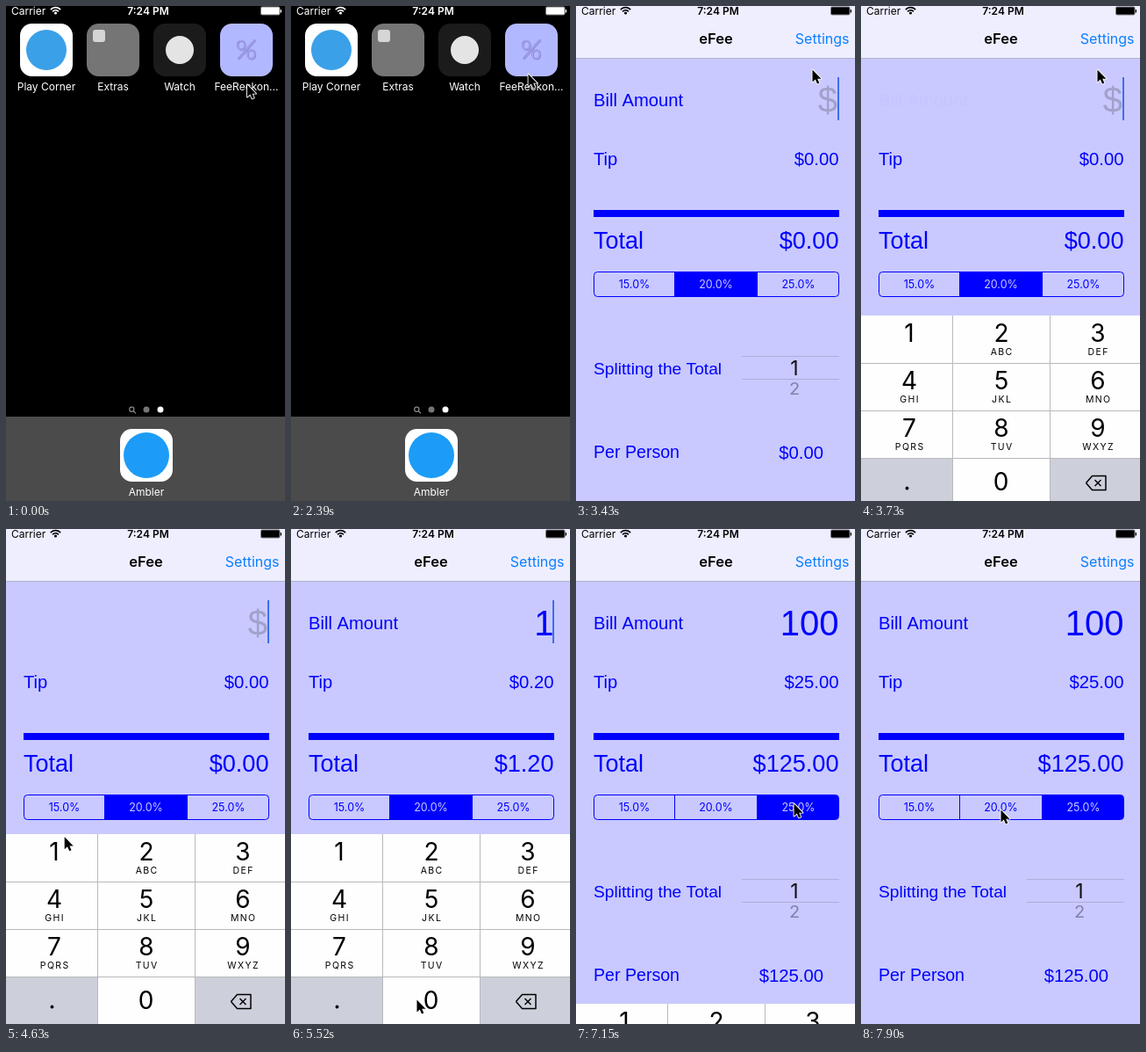
These frames come from a looping animation (318 px wide and 563 px high, 8000 ms). An HTML page with a canvas:

```html
<!DOCTYPE html>
<html lang="en">
<head>
<meta charset="utf-8">
<title>Tip calculator demo</title>
<style>
  html, body { margin: 0; width: 100%; height: 100%; overflow: hidden; background: #000; }
  canvas { display: block; width: 318px; height: 563px; }
</style>
</head>
<body>
<canvas id="stage"></canvas>
<script>
const W = 318, H = 563, LOOP = 8000, STEP = 149.2;
const UI = 'Inter, sans-serif', HELV = '"Liberation Sans", Arial, sans-serif';
const BLUE = '#00f', LAVENDER = '#c9c9ff', SPLASH = '#b0aeff', KEY_GREY = '#cdd0da';
const KEYBOARD_H = 216, KEYBOARD_TOP = H - KEYBOARD_H;

const canvas = document.getElementById('stage');
const ctx = canvas.getContext('2d');
const dpr = window.devicePixelRatio || 1;
canvas.width = W * dpr;
canvas.height = H * dpr;

// Pointer tip: [tick, x, y]
const POINTER = [
  [0, 274.5, 89], [1, 270, 80], [3, 270, 80], [4, 270, 82], [5, 270, 82], [6, 270, 83],
  [15, 270, 83], [16, 270, 77], [17, 269, 72], [26, 269, 72], [32, 50, 372], [34, 50, 372],
  [37, 143, 535], [42, 143, 535], [43, 158, 449], [45, 248, 312], [48, 248, 312], [53, 159, 319]
];

const clamp = v => Math.max(0, Math.min(1, v));

function scoped(draw, alpha = 1) {
  ctx.save();
  ctx.globalAlpha *= alpha;
  draw();
  ctx.restore();
}

function text(str, x, y, size, color, { font = UI, align = 'left', weight = 400, spacing = 0 } = {}) {
  ctx.font = `${weight} ${size}px ${font}`;
  ctx.textAlign = align;
  ctx.letterSpacing = spacing + 'px';
  ctx.fillStyle = color;
  ctx.fillText(str, x, y);
}

function rect(x, y, w, h, color) {
  ctx.fillStyle = color;
  ctx.fillRect(x, y, w, h);
}

function roundRect(x, y, w, h, r, color) {
  ctx.beginPath();
  ctx.roundRect(x, y, w, h, r);
  ctx.fillStyle = color;
  ctx.fill();
}

function disc(x, y, r, color) {
  ctx.beginPath();
  ctx.arc(x, y, r, 0, 7);
  ctx.fillStyle = color;
  ctx.fill();
}

function line(points, color, width = 1) {
  ctx.beginPath();
  points.forEach(([x, y]) => ctx.lineTo(x, y));
  ctx.strokeStyle = color;
  ctx.lineWidth = width;
  ctx.stroke();
}

function statusBar(color) {
  text('Carrier', 6, 10, 12, color);
  ctx.strokeStyle = color;
  ctx.lineWidth = 1.7;
  for (const r of [4.6, 7.8]) {
    ctx.beginPath();
    ctx.arc(56.5, 9.5, r, -Math.PI * 0.76, -Math.PI * 0.24);
    ctx.stroke();
  }
  disc(56.5, 8, 1.6, color);
  text('7:24 PM', 162, 10, 12, color, { align: 'center', weight: 600 });
  scoped(() => roundRect(290, 0.5, 22.5, 10, 2, color), 0.5);
  roundRect(291, 1.5, 20.5, 8, 1, color);
  roundRect(312.7, 4, 1.3, 3.5, 0.6, color);
}

// Embossed: a soft shadow, a dark rim and a light face.
function percentSign(x, y, scale) {
  scoped(() => {
    ctx.translate(x, y);
    ctx.scale(scale, scale);
    const shape = new Path2D();
    shape.ellipse(-17, -16, 12, 14, 0, 0, 7);
    shape.moveTo(27.5, 14);
    shape.ellipse(15.5, 14, 12, 14, 0, 0, 7);
    shape.moveTo(-27, 29);
    shape.lineTo(28, -33);
    for (const [shift, width, color] of [[2, 5, '#8886cc'], [0, 5, '#7f7dcb'], [0.5, 3.6, '#aaa8f8']]) {
      scoped(() => {
        ctx.translate(shift, shift);
        ctx.strokeStyle = color;
        ctx.lineWidth = width;
        ctx.stroke(shape);
      });
    }
  });
}

function appIcon(x, y, color, label) {
  roundRect(x, y, 60, 60, 13.5, color);
  text(label, x + 30, y + 76, 12, '#fff', { align: 'center' });
}

function home(pressed) {
  appIcon(16, 20, '#fff', 'Play Corner');
  disc(46, 50, 23, '#3aa0e8');
  appIcon(92, 20, '#757575', 'Extras');
  roundRect(99, 27, 14, 14, 3, '#d5d5d5');
  appIcon(168, 20, '#1b1b1b', 'Watch');
  disc(198, 50, 16, '#e4e4e4');
  appIcon(244, 20, '#b2b8ff', 'FeeReckon...');
  percentSign(274, 50, 0.35);
  if (pressed) roundRect(244, 20, 60, 60, 13.5, 'rgba(0,0,0,.45)');

  ctx.beginPath();
  ctx.arc(143.3, 458.7, 2.6, 0, 7);
  ctx.strokeStyle = '#8a8a8a';
  ctx.lineWidth = 1.2;
  ctx.stroke();
  line([[145.3, 460.7], [148, 463.4]], '#8a8a8a', 1.3);
  disc(160, 459, 3.5, '#757575');
  disc(176, 459, 3.5, '#fff');

  rect(0, 467, W, 96, '#4b4b4b');
  appIcon(130, 481, '#fff', 'Ambler');
  disc(160, 511, 26, '#1c9cf6');
}

// The launch window grows out of its icon and carries the home screen with it.
function launch(p, pressed) {
  const x = 244 * (1 - p), y = 20 * (1 - p) ** 2;
  const w = 60 + 258 * p ** 0.95, h = 60 + 503 * p ** 1.335;
  scoped(() => {
    const zoom = w / 60;
    ctx.translate(x, y);
    ctx.scale(zoom, zoom);
    ctx.translate(-244, -20);
    home(pressed);
  }, 1 - p);
  scoped(() => statusBar('#fff'), 1 - p);
  if (!p) return;
  scoped(() => {
    rect(x, y, w, h, SPLASH);
    percentSign(x + w / 2, y + h / 2 - 1, 1.21 * w / W);
    ctx.translate(x, y + (p < 1 ? 2.7 : 0));
    ctx.scale(w / W, w / W);
    statusBar('#000');
  }, clamp(p * 1.5));
}

function keyboard(offset, pressedKey) {
  const letters = ['', 'ABC', 'DEF', 'GHI', 'JKL', 'MNO', 'PQRS', 'TUV', 'WXYZ'];
  const edges = [0, 104.5, 215.5, W], centers = [55, 160, 270];
  scoped(() => {
    ctx.translate(0, KEYBOARD_TOP + offset);
    rect(0, 0, W, KEYBOARD_H, '#fefefe');
    const fillKey = (col, row) =>
      rect(edges[col], row * 54, edges[col + 1] - edges[col], 54, KEY_GREY);
    fillKey(0, 3);
    fillKey(2, 3);
    if (pressedKey === '1') fillKey(0, 0);
    if (pressedKey === '0') fillKey(1, 3);

    letters.forEach((label, i) => {
      const x = centers[i % 3], y = Math.floor(i / 3) * 54;
      text(i + 1, x, y + 30, 28, '#000', { align: 'center' });
      text(label, x + 0.7, y + 45, 10.5, '#000', { align: 'center', spacing: 1.4 });
    });
    text('0', 159.5, 199, 28, '#000', { align: 'center' });
    disc(52.5, 196.5, 1.9, '#000');

    ctx.lineJoin = 'round';
    line([[256.5, 190.5], [263.5, 182.5], [279, 182.5], [279, 198.5], [263.5, 198.5], [256.5, 190.5]], '#000', 1.5);
    line([[266.5, 187], [273.5, 194]], '#000', 1.5);
    line([[273.5, 187], [266.5, 194]], '#000', 1.5);

    for (const y of [54.5, 108.5, 162.5]) line([[0, y], [W, y]], '#b9b9bd');
    for (const x of [104.5, 215.5]) line([[x, 0], [x, KEYBOARD_H]], '#b9b9bd');
  });
}

function segments(selected) {
  const edges = [20.5, 112.5, 206.5, 299.5];
  scoped(() => {
    ctx.beginPath();
    ctx.roundRect(20.5, 302.5, 279, 28, 4);
    ctx.strokeStyle = BLUE;
    ctx.lineWidth = 1;
    ctx.stroke();
    ctx.clip();
    rect(edges[selected], 302, edges[selected + 1] - edges[selected], 29, BLUE);
  });
  for (const x of edges.slice(1, 3)) line([[x, 302.5], [x, 330.5]], BLUE);
  ['15.0%', '20.0%', '25.0%'].forEach((label, i) =>
    text(label, [66.5, 159.5, 253.5][i], 321, 12.5, i === selected ? LAVENDER : BLUE, { align: 'center' }));
}

function calculator({ amount, rate, labelAlpha, caret }) {
  const money = v => '$' + v.toFixed(2);
  const label = (str, y, size) => text(str, 20, y, size, BLUE, { font: HELV });
  const value = (str, y, size, color = BLUE, x = 299.5) =>
    text(str, x, y, size, color, { font: HELV, align: 'right' });
  const tip = amount * rate, total = amount * (1 + rate);

  rect(0, 0, W, H, LAVENDER);
  rect(0, 0, W, 59, '#efeeff');
  rect(0, 59, W, 1, '#b3b1cf');
  statusBar('#000');
  text('eFee', 159.5, 43, 16.5, '#000', { align: 'center', weight: 600 });
  text('Settings', 311.5, 43, 16, '#0a7fff', { align: 'right' });

  scoped(() => label('Bill Amount', 114, 20.2), labelAlpha);
  if (amount) value(amount, 120.5, 40);
  else value('$', 120.5, 40, '#a1a1cc', 298);
  if (caret) rect(298, 81, 2, 49, '#3f6ff0');

  label('Tip', 181, 20.2);
  value(money(tip), 181, 20.3);
  rect(20, 232, 280, 8, BLUE);
  label('Total', 276, 27);
  value(money(total), 276, 27.1);
  segments(rate === 0.2 ? 1 : 2);

  label('Splitting the Total', 419, 19.2);
  for (const y of [398.5, 424.5]) line([[189, y], [300, y]], '#aeaedc');
  text('1', 249, 420, 23, '#111', { align: 'center' });
  scoped(() => {
    ctx.translate(249, 442);
    ctx.scale(1, 0.9);
    text('2', 0, 0, 20, '#8080a8', { align: 'center' });
  });
  label('Per Person', 514, 19.6);
  value(money(total), 515, 20.3, BLUE, 282);
}

function pointer(n) {
  const i = Math.max(1, POINTER.findIndex(k => k[0] >= n));
  const [n0, x0, y0] = POINTER[i - 1], [n1, x1, y1] = POINTER[i];
  const u = clamp((n - n0) / (n1 - n0)), ease = u * u * (3 - 2 * u);
  scoped(() => {
    ctx.translate(x0 + (x1 - x0) * ease, y0 + (y1 - y0) * ease);
    ctx.beginPath();
    [[0.5, 0.5], [0.5, 14.5], [3.8, 11.5], [6, 16.5], [8.3, 15.5], [6.2, 10.7], [10.5, 10.7]]
      .forEach(([x, y]) => ctx.lineTo(x, y));
    ctx.closePath();
    ctx.lineJoin = 'round';
    ctx.strokeStyle = '#fff';
    ctx.lineWidth = 1.8;
    ctx.stroke();
    ctx.fillStyle = '#000';
    ctx.fill();
  });
}

function keyboardOffset(n) {
  if (n < 23) return KEYBOARD_H;
  const slide = Math.exp(-1.88 * (n < 47 ? n - 23 : n - 46.8));
  return Math.round(KEYBOARD_H * (n < 47 ? slide : 1 - slide));
}

function pressedKey(n) {
  if (n === 33) return '1';
  return n === 38 || n === 40 ? '0' : '';
}

function draw(n) {
  ctx.setTransform(dpr, 0, 0, dpr, 0, 0);
  rect(0, 0, W, H, '#000');
  if (n < 23) launch(n < 19 ? 0 : n === 19 ? 0.3 : n === 20 ? 0.777 : 1, n === 17 || n === 18);
  if (n >= 22) {
    const offset = keyboardOffset(n);
    scoped(() => calculator({
      amount: n < 34 ? '' : n < 39 ? '1' : n < 40 ? '10' : '100',
      rate: n < 47 ? 0.2 : 0.25,
      labelAlpha: n < 33 ? offset / KEYBOARD_H : clamp((n - 33) / 3),
      caret: n < 28 || (n > 30 && n < 45)
    }), n === 22 ? 0.5 : 1);
    if (offset < KEYBOARD_H) keyboard(offset, pressedKey(n));
  }
  pointer(n);
}

function loop() {
  draw(Math.floor((performance.now() % LOOP + 21) / STEP));
  requestAnimationFrame(loop);
}
loop();
</script>
</body>
</html>
```
